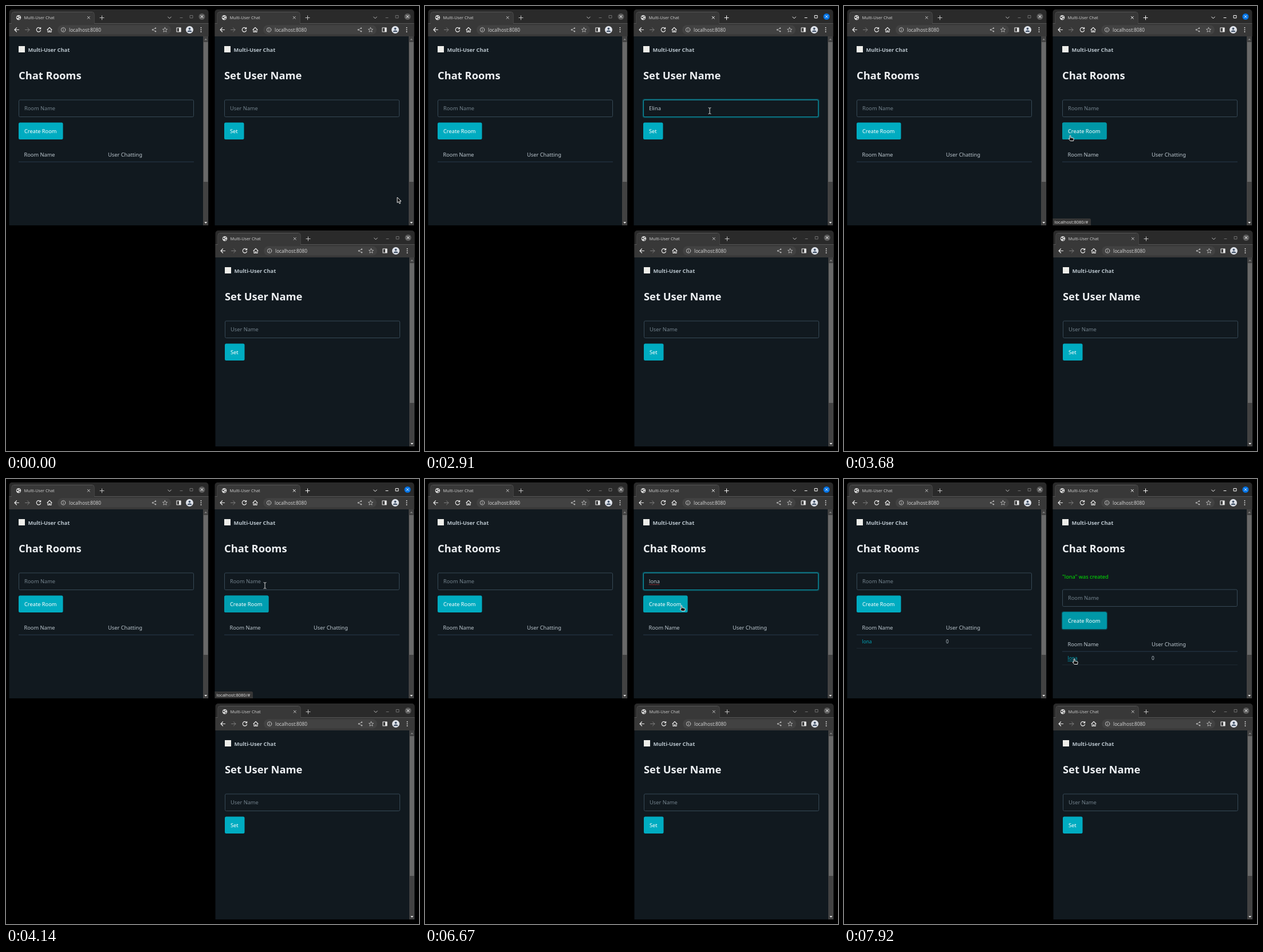
An HTML page for the animation above (8000 ms loop, 721x777 px).

```html
<!DOCTYPE html>
<html lang="en">
<head>
<meta charset="utf-8">
<title>Multi-User Chat</title>
<style>
  html, body { margin: 0; width: 100%; height: 100%; overflow: hidden; background: #000; }
  svg { display: block; width: 721px; height: 777px; }
  text { font: 9.25px "Noto Sans", "Open Sans", sans-serif; fill: #bbc6ce; white-space: pre; }
  .title { font-size: 18.35px; font-weight: 700; fill: #edf0f3; }
  .brand { font-weight: 700; }
  .tab { font-size: 7.25px; fill: #c8c8c8; }
  .url { font-size: 8.25px; fill: #cfcfcf; }
  .status { font-size: 7.55px; fill: #dcdcdc; }
  .hint { fill: #73828c; }
  .label { fill: #fff; }
  .cell { font-size: 8.3px; }
  .link { font-size: 8.3px; fill: #00a3b7; }
  .note { fill: #00e600; }
  .line { fill: none; stroke: #e8e8e8; stroke-linecap: round; stroke-linejoin: round; }
  .field { fill: #11191f; stroke: #374956; }
  .ring { fill: none; stroke: #00acc1; }
</style>
</head>
<body>
<svg id="stage" viewBox="0 0 721 777"></svg>
<script>
const LOOP = 8000;
const stage = document.getElementById('stage');

// Markup helpers. `on` lists "from-to" times, `fade` is the ramp length.
const text = (x, y, str, cls = '') => `<text x="${x}" y="${y}" class="${cls}">${str}</text>`;
const rect = (x, y, w, h, more = '') => `<rect x="${x}" y="${y}" width="${w}" height="${h}" ${more}/>`;
const line = (d, more = '') => `<path class="line" d="${d}" ${more}/>`;
const when = (on, body, fade = 0) => `<g data-on="${on}" data-fade="${fade}">${body}</g>`;
const move = (x, y, body) => `<g transform="translate(${x} ${y})">${body}</g>`;

function tabBar(active) {
  const main = active ? '#fff' : '#c4c4c4';
  const dim = active ? '#fff' : '#707070';
  return `<g style="--c:${main}">` +
    text(31.5, 23.3, 'Multi-User Chat', 'tab') +
    line('M142.3 18.3l4 4m0-4l-4 4', `style="stroke:${main}"`) +
    line('M164 20.5h7m-3.500-3.500v7', `style="stroke:${main}"`) +
    line('M282.700 19l2.800 2.800 2.800-2.800', `style="stroke:${main}"`) +
    line('M304 20.500h4', `style="stroke:${dim}"`) +
    line('M321.500 16.500h4.500v4.500h-4.500z', `style="stroke:${dim}"`) +
    `<circle cx="342" cy="18.500" r="5.500" fill="${active ? '#0073e5' : '#5c5c5c'}"/>` +
    line('M340 16.500l4 4m0-4l-4 4', 'style="stroke:#fff"') + '</g>';
}

const toolbar =
  line('M22.500 41.500h-7.500m3.500-3.500l-3.500 3.500 3.500 3.500', 'stroke-width="1.2"') +
  line('M33.500 41.500h7.500m-3.500-3.500l3.500 3.500-3.500 3.500', 'style="stroke:#7c7c7c"') +
  line('M60 39.300a3.700 3.700 0 1 0 .5 3.200M60.600 37.500v2.500h-2.500', 'stroke-width="1.2"') +
  line('M72 41.500l4-4 4 4m-7-.5v4.500h2.200v-2.500h1.600v2.500h2.200v-4.500', 'stroke-width="1.1"') +
  rect(90, 33.5, 198, 16, 'rx="8" fill="#424242"') +
  '<circle class="line" cx="100" cy="41.500" r="3.700" style="stroke:#bdbdbd"/>' +
  line('M100 41.300v2m0-3.900v.1', 'style="stroke:#bdbdbd"') +
  text(110, 44.5, 'localhost:8080', 'url') +
  line('M261 38.700l-5 2.800 5 2.800', 'style="stroke:#b4b4b4" stroke-width=".8"') +
  [[261, 38.7], [256, 41.5], [261, 44.3]].map(([x, y]) => `<circle cx="${x}" cy="${y}" r="1.200" fill="#b4b4b4"/>`).join('') +
  line('M277.500 37.500l1.200 2.700 2.900.3-2.200 1.900.7 2.900-2.600-1.500-2.600 1.500.7-2.900-2.200-1.900 2.900-.3z', 'style="stroke:#c4c4c4" stroke-width=".8"') +
  line('M298 38h7v7h-7z', 'stroke-width="1.1"') + rect(302, 38, 3.2, 7, 'fill="#e8e8e8"') +
  '<circle cx="320.500" cy="41.500" r="6.500" fill="#dfe3ea"/><circle cx="320.500" cy="39.600" r="1.900" fill="#44546a"/>' +
  '<path d="M316.700 45.200q0-2.700 3.800-2.700t3.800 2.700z" fill="#44546a"/>' +
  [38, 41.5, 45].map(y => `<circle cx="340.500" cy="${y}" r=".9" fill="#e8e8e8"/>`).join('');

const globe = '<circle cx="22" cy="20.300" r="4.200" fill="#e0e0e0"/>' +
  '<path d="M19 18.500l2 .3 1 1.500-1.500 1.200-2-1.500zM22.500 17.500l2.200.7-.9 1.300-1.500-.5zM22.500 21.500l2.300-.4-.7 2-1.400.6z" fill="#3b3b3b"/>';

const scrollbar = rect(344, 53, 9, 330, 'fill="#424242"') + rect(345, 63, 7.5, 244, 'fill="#696969"') +
  '<path d="M346.300 59.500l2.400-2.800 2.400 2.800z" fill="#858585"/><path d="M346.300 377l2.400 2.800 2.400-2.800z" fill="#f2f2f2"/>';

function browser(x, y, bar, body) {
  return move(x, y,
    '<path d="M5.500 53V11a5 5 0 0 1 5-5h338a5 5 0 0 1 5 5v42z" fill="#2a2a2a"/>' +
    rect(5.5, 31, 348, 22, 'fill="#383838"') +
    '<path d="M5.500 30.500H10V14.500a4 4 0 0 1 4-4H150a4 4 0 0 1 4 4V30.500H353.500" fill="none" stroke="#606060" stroke-width=".8"/>' +
    '<path d="M10.400 31.500V14.500a3.600 3.600 0 0 1 3.600-3.600H150a3.600 3.600 0 0 1 3.600 3.600V31.500z" fill="#383838"/>' +
    globe + bar + toolbar +
    rect(5.5, 53, 348, 330, 'fill="#11191f"') +
    rect(22, 70, 11, 11, 'fill="#eeeeea"') +
    text(38.5, 79.5, 'Multi-User Chat', 'brand') + body + scrollbar);
}

const field = rect(22.5, 164, 305, 29.5, 'rx="2" class="field"');
const hint = str => text(32, 182, str, 'hint');
const button = (w, label, glow = '') =>
  rect(22, 203.5, w, 29.5, 'rx="2.500" fill="#00acc1"') + glow + text(32, 221.6, label, 'label');
const dark = w => rect(22, 203.5, w, 29.5, 'rx="2.500" fill="#0097a7"');
const outline = (x, y, w, h) => rect(x, y, w, h, 'rx="3" class="ring" stroke-width="2" stroke-opacity=".3"');
const focus = outline(21.5, 163, 307, 31.5) +
  rect(22.5, 164, 305, 29.5, 'rx="2" class="ring" stroke-opacity=".8"');

const table = text(31.5, 263, 'Room Name') + text(178, 263, 'User Chatting') +
  rect(22, 271.3, 306, 1.7, 'fill="#1f2d3a"');
const row = text(31.5, 287.2, 'lona', 'link') + text(178, 287.2, '0', 'cell') +
  rect(22, 295, 306, 1, 'fill="#1c2831"');

// One group per typed prefix; the caret is put after its text once laid out.
function typed(word, times, caretOff, end) {
  return times.map((t, i) => {
    const next = times[i + 1] ?? end;
    const off = i == 0 || i == word.length ? caretOff[i ? 1 : 0] : next;
    return when(`${t}-${next}`, text(32, 182, word.slice(0, i), 'typed') +
      when(`${t}-${off}`, rect(32, 173.5, .9, 10.5, 'fill="#bbc6ce" class="caret"')));
  }).join('');
}

const setPage = (input, glow) => text(22, 127.7, 'Set User Name', 'title') + field + input + button(34.5, 'Set', glow);
const roomTitle = text(22, 127.7, 'Chat Rooms', 'title');
const squiggle = line('M32 184.300' + 'q.75-1.300 1.500 0t1.500 0'.repeat(6), 'style="stroke:#c8383c" stroke-width=".8"');

const namePage = setPage(
  when('0-1430', hint('User Name')) + when('630-3640', focus, 160) +
  typed('Elina', [710, 1430, 1740, 2000, 2160, 2330], [1180, 2910], 3680),
  when('3290-9000', dark(34.5), 150) + when('3640-3680', outline(21.5, 203, 35.5, 30.5)));

const roomPage = field + when('3680-5120', hint('Room Name')) + when('4300-6820', focus, 150) +
  typed('lona', [4370, 5120, 5190, 5440, 5520], [4870, 6100], 6900) +
  when('6510-6900', squiggle) +
  button(77.5, 'Create Room', when('3400-4070 6590-9000', dark(77.5), 200)) + table;

const createdPage = text(22, 174, '"lona" was created', 'note') + move(0, 29,
  field + hint('Room Name') + outline(21.5, 203, 78.5, 30.5) + button(77.5, 'Create Room', dark(77.5)) +
  table + row + when('7900-8000', rect(31.5, 288.5, 17, .8, 'fill="#00a3b7"')));

const bubble = '<path d="M5.500 371H69.500a2.500 2.500 0 0 1 2.500 2.500V383H5.500z" fill="#363636"/>' +
  text(8.5, 379.8, 'localhost:8080/#', 'status');

const arrow = '<path d="M0 0v9.500l2.200-2 1.700 3.600 1.700-.8-1.600-3.500h3z" fill="#111" stroke="#fff" stroke-width=".9" stroke-linejoin="round"/>';
const beam = line('M-2-5.300q1.500 0 2 .9.5-.9 2-.9M0-4.400v8.800M-2 5.300q1.500 0 2-.9.5.9 2 .9', 'style="stroke:#d8d8d8"');
const hand = '<path d="M-.9.800a.9.900 0 0 1 1.800 0v3l4 .7q1.300.3 1.200 1.600l-.5 3.400h-5.500l-3-3.600q.2-1.200 2 0z" fill="#111" stroke="#fff" stroke-width=".9" stroke-linejoin="round"/>';

stage.innerHTML =
  browser(0, 0, tabBar(false), roomTitle + field + hint('Room Name') + button(77.5, 'Create Room') + table + when('6900-8000', row)) +
  browser(359, 0, when('0-630', tabBar(false)) + when('630-8000', tabBar(true)),
    when('0-3680', namePage) +
    when('3680-8000', roomTitle + when('3680-6900', roomPage) + when('6900-8000', createdPage)) +
    when('3430-4380 6750-7380', bubble, 80)) +
  browser(360, 386, tabBar(false), setPage(hint('User Name'))) +
  '<g id="pointer">' +
  when('0-300 7300-7900', arrow) +
  when('300-3290 4070-6590 6970-7300', beam) +
  when('3290-4070 6590-6970 7900-8000', hand) + '</g>';

for (const caret of stage.querySelectorAll('.caret')) {
  const label = caret.parentNode.previousElementSibling;
  if (label.textContent) caret.setAttribute('x', 32 + label.getComputedTextLength());
}

const timed = [...stage.querySelectorAll('[data-on]')].map(el => ({
  el,
  fade: +el.dataset.fade,
  spans: el.dataset.on.split(' ').map(s => s.split('-').map(Number))
}));
const pointer = document.getElementById('pointer');

// Pointer moves: start, steps, step length, goal x, goal y, sideways bend.
const moves = [
  [70, 5, 80, 497, 183, 0],
  [2990, 6, 76, 395, 226, 0],
  [3760, 6, 76, 452, 186, 0],
  [6430, 4, 80, 448, 221, 0],
  [7300, 9, 77.5, 402, 314, 58]
];

const clamp = v => Math.max(0, Math.min(1, v));
const ramp = (v, fade) => fade ? clamp(v / fade) : +(v >= 0);

function pointerAt(t) {
  let x = 683, y = 334;
  for (const [start, steps, dt, gx, gy, bend] of moves) {
    if (t < start) break;
    const u = Math.min(1, (Math.floor((t - start) / dt) + 1) / steps);
    const e = u * u * (3 - 2 * u);
    x += (gx - x) * e + bend * 4 * e * (1 - e);
    y += (gy - y) * e;
  }
  return [x, y];
}

function render(t) {
  for (const { el, fade, spans } of timed) {
    const alpha = Math.max(...spans.map(([a, b]) => ramp(t - a, fade) * (1 - ramp(t - b, fade))));
    el.style.opacity = alpha;
  }
  pointer.setAttribute('transform', `translate(${pointerAt(t).map(v => v.toFixed(1))})`);
}

const begin = performance.now();
function tick() {
  render((performance.now() - begin) % LOOP);
  requestAnimationFrame(tick);
}
tick();
</script>
</body>
</html>
```
